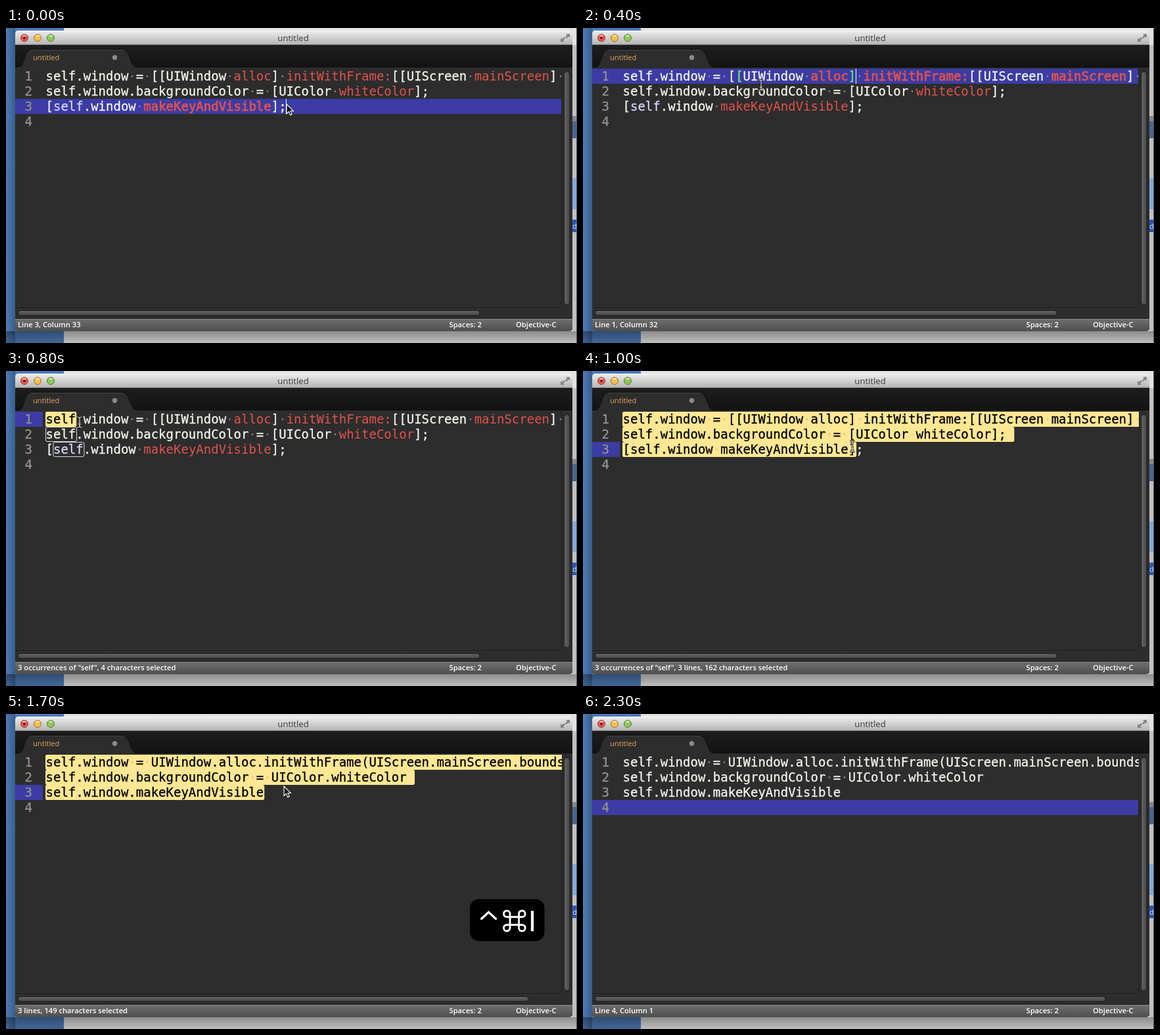
An HTML page for the animation above (2.4 s loop, 869 by 480 pixels).

```html
<!DOCTYPE html>
<html lang="en">
<head>
<meta charset="utf-8">
<title>Editor demo</title>
<style>
  html, body { margin: 0; width: 100%; height: 100%; overflow: hidden; background: #b4b4b4; }
  svg { display: block; width: 869px; height: 480px; }
  text { white-space: pre; }
  .ui { font-family: "Open Sans", "Noto Sans", sans-serif; }
  .status { font-size: 11.2px; font-weight: 600; fill: #fff; }
  .code { font: 19px "DejaVu Sans Mono", monospace; fill: #f4f4ee; stroke: #f4f4ee; stroke-width: .3; }
  .code .red { fill: #e0524c; stroke: none; }
  .code .self { fill: #d4d4ff; stroke: #d4d4ff; }
  .code .match { fill: #62f07c; stroke: #62f07c; }
  .code .dot { fill: #777; stroke: none; }
  .code .picked { fill: #000; stroke: #000; }
  .code .pickedDot { fill: #dcc97f; stroke: none; }
  .active .red { stroke: #e0524c; stroke-width: .75; }
  .active .dot { fill: #7d7dc4; }
  .num { font: 19px "DejaVu Sans Mono", monospace; fill: #91918c; stroke: #91918c; stroke-width: .4; }
</style>
</head>
<body>
<svg viewBox="0 0 869 480">
  <defs>
    <linearGradient id="title" x2="0" y2="1"><stop stop-color="#eeeeee"/><stop offset="1" stop-color="#b3b3b3"/></linearGradient>
    <linearGradient id="tabs" x2="0" y2="1"><stop stop-color="#1d1d1d"/><stop offset="1" stop-color="#131313"/></linearGradient>
    <linearGradient id="foot" x2="0" y2="1"><stop stop-color="#707070"/><stop offset="1" stop-color="#4e4e4e"/></linearGradient>
    <linearGradient id="thumbH" x2="0" y2="1"><stop stop-color="#646464"/><stop offset="1" stop-color="#484848"/></linearGradient>
    <linearGradient id="thumbV"><stop stop-color="#646464"/><stop offset="1" stop-color="#484848"/></linearGradient>
    <linearGradient id="under" x2="0" y2="1"><stop stop-color="#000" stop-opacity=".38"/><stop offset="1" stop-color="#000" stop-opacity=".16"/></linearGradient>
    <linearGradient id="side"><stop stop-color="#000" stop-opacity="0"/><stop offset="1" stop-color="#000" stop-opacity=".25"/></linearGradient>
    <clipPath id="pane"><rect x="14" y="60" width="832" height="367"/></clipPath>
  </defs>

  <!-- desktop -->
  <rect width="869" height="480" fill="#e2e2e2"/>
  <rect width="88" height="480" fill="#4d7cb8"/>
  <rect width="14" height="480" fill="url(#side)"/>
  <rect x="862" y="26" width="7" height="436" fill="#c0c0c2"/>
  <rect x="862" y="134" width="7" height="8" fill="#85888d"/>
  <rect x="862" y="142" width="7" height="26" fill="#4b658d"/>
  <rect x="862" y="229" width="7" height="47" fill="#86a9d6"/>
  <rect x="862" y="292" width="7" height="19" fill="#2b56b4"/>
  <text class="ui" x="862" y="306" font-size="11" fill="#dce6fa">d</text>
  <rect y="462" width="869" height="18" fill="url(#under)"/>
  <rect x="868" width="1" height="480" fill="#55585c"/>

  <!-- window -->
  <path d="M14 26V9q0-5 5-5H857q5 0 5 5V26Z" fill="url(#title)"/>
  <path d="M18 4.5H858" stroke="#f8f8f8"/>
  <rect x="14" y="25" width="848" height="1" fill="#707070"/>
  <g stroke-width="1">
    <circle cx="28" cy="15" r="5.5" fill="#ec5750" stroke="#963b37"/>
    <circle cx="28" cy="15" r="2" fill="#65100d"/>
    <circle cx="48" cy="15" r="5.5" fill="#f3bd4e" stroke="#9a7430"/>
    <circle cx="68" cy="15" r="5.5" fill="#8fc858" stroke="#547c35"/>
    <g fill="#fff" opacity=".5"><ellipse cx="28" cy="11.8" rx="3" ry="1.5"/><ellipse cx="48" cy="11.8" rx="3" ry="1.5"/><ellipse cx="68" cy="11.8" rx="3" ry="1.5"/></g>
  </g>
  <text class="ui" x="437" y="20" font-size="13.1" text-anchor="middle" fill="#3c3c3c">untitled</text>
  <path d="M852 9h6v6l-2-2-3 3-2-2 3-3Z M844 15l2 2 3-3 2 2-3 3 2 2h-6Z" fill="#858585"/>
  <rect x="14" y="26" width="848" height="34" fill="url(#tabs)"/>
  <rect x="14" y="59" width="848" height="401" fill="#2d2d2d"/>
  <path d="M14 59.5H20C30 59 27 32.5 39 32.5H177C189 32.5 188 59 198 59.5H862" fill="#2d2d2d" stroke="#0c0c0c"/>
  <path d="M20 60C30 59 27 33 39 33H177C189 33 188 59 198 60Z" fill="#2d2d2d"/>
  <path d="M38 33.5H178" stroke="#484848"/>
  <text class="ui" x="41" y="49" font-size="11.2" fill="#e8a45c">untitled</text>
  <circle cx="165.500" cy="45" r="3.7" fill="#8b8b8b"/>

  <g clip-path="url(#pane)">
    <g id="marks"></g>
    <g id="lines"></g>
    <rect id="caret" width="1" height="23" fill="#f8f8f0"/>
  </g>

  <path d="M846.5 60V426.500H14" fill="none" stroke="#191919"/>
  <path d="M847.5 60V427.500H14" fill="none" stroke="#383838"/>
  <rect x="849.5" y="66.5" width="8.500" height="355" rx="4.250" fill="url(#thumbV)" stroke="#1b1b1b"/>
  <rect id="thumb" x="18.5" y="430.500" height="7.500" rx="3.750" fill="url(#thumbH)" stroke="#1b1b1b"/>

  <path d="M14 443H862V457q0 5-5 5H19q-5 0-5-5Z" fill="url(#foot)"/>
  <path d="M14 443.500H862" stroke="#838383"/>
  <path d="M14 442.500H862" stroke="#171717"/>
  <text class="ui status" id="status" x="18" y="456"></text>
  <text class="ui status" x="674.500" y="456">Spaces: 2</text>
  <text class="ui status" x="776" y="456">Objective-C</text>

  <g id="keys" fill="none" stroke="#fff" stroke-width="3.200">
    <rect x="706" y="282" width="113.500" height="64" rx="14" fill="#000" stroke="none"/>
    <path d="M722.500 313L734.500 302L746.500 313"/>
    <path id="command" d="M767 309V304.500A4.800 4.800 0 1 0 762.200 309.300H785.300A4.800 4.800 0 1 0 780.500 304.500V326A4.800 4.800 0 1 0 785.300 321.200H762.200A4.800 4.800 0 1 0 767 326Z" stroke-width="2.900"/>
    <text x="794.750" y="331" fill="#fff" stroke="none" style="font:45px 'Liberation Sans',Arial,sans-serif">I</text>
  </g>

  <path id="arrow" d="M0 0V14.500L3.400 11.400L5.700 16.700L8.200 15.600L5.900 10.500H10.400Z" fill="#111" stroke="#fff" stroke-width="1.100"/>
  <g id="beam" fill="none">
    <path d="M-3.500 -8Q0 -8 0 -5.500V5.500Q0 8 -3.500 8M3.500 -8Q0 -8 0 -5.500V5.500Q0 8 3.500 8M-2 3H2" stroke="#111" stroke-width="2.800"/>
    <path d="M-3.500 -8Q0 -8 0 -5.500V5.500Q0 8 -3.500 8M3.500 -8Q0 -8 0 -5.500V5.500Q0 8 3.500 8M-2 3H2" stroke="#f2f2f2" stroke-width="1.100"/>
  </g>
</svg>
<script>
const LOOP = 2400, STEP = 100;
const LEFT = 60.5, TOP = 62, CHAR = 11.439, ROW = 23;

const before = [
  'self.window = [[UIWindow alloc] initWithFrame:[[UIScreen mainScreen] bounds]];',
  'self.window.backgroundColor = [UIColor whiteColor];',
  '[self.window makeKeyAndVisible];',
  ''
];
const after = [
  'self.window = UIWindow.alloc.initWithFrame(UIScreen.mainScreen.bounds)',
  'self.window.backgroundColor = UIColor.whiteColor',
  'self.window.makeKeyAndVisible',
  ''
];
const messages = /alloc|initWithFrame:|mainScreen|bounds|whiteColor|makeKeyAndVisible/g;

// Cursor position by start time; a selection always runs from the top to it.
const edits = [
  { at: 0, row: 2, col: 32 },
  { at: 300, row: 0, col: 31, match: [15, 30] },
  { at: 700, row: 0, col: 0 },
  { at: 800, row: 0, col: 4, select: true, found: true },
  { at: 900, row: 1, col: 21, select: true, found: true },
  { at: 1000, row: 2, col: 31, select: true, found: true },
  { at: 1100, row: 2, col: 32, select: true, found: true },
  { at: 1500, row: 2, col: 29, select: true, converted: true },
  { at: 1900, row: 3, col: 0, converted: true }
];

// time, x, y
const path = [
  [0, 427, 116], [100, 426, 108], [200, 418, 82], [300, 400, 80], [400, 271, 87],
  [600, 63, 76], [700, 63, 76], [800, 112, 78], [900, 300, 100], [1000, 410, 115],
  [1100, 428, 119], [1300, 423, 110], [1700, 423, 110], [1800, 414, 150], [1900, 406, 178], [2200, 406, 178]
];

const $ = id => document.getElementById(id);
const show = (id, on) => $(id).setAttribute('visibility', on ? 'visible' : 'hidden');
const xAt = col => LEFT + col * CHAR;
const rect = (x, y, w, h, extra) => `<rect x="${x}" y="${y}" width="${w}" height="${h}" ${extra}/>`;

function pointerAt(t) {
  const i = Math.max(1, path.findIndex(p => p[0] >= t));
  const [a, b] = [path[i - 1], path[i]];
  const k = (t - a[0]) / (b[0] - a[0]);
  return [1, 2].map(n => a[n] + (b[n] - a[n]) * k);
}

function selectedCols(edit, row, text) {
  if (!edit.select || row > edit.row) return 0;
  return row < edit.row ? text.length + 1 : edit.col;
}

function lineMarkup(text, row, edit) {
  const styles = Array(text.length).fill('');
  const paint = (start, length, style) => styles.fill(style, start, start + length);
  if (!edit.converted) {
    for (const m of text.matchAll(messages)) paint(m.index, m[0].length, 'red');
    if (row === 2) paint(1, 4, 'self');
  }
  if (edit.match && row === edit.row) edit.match.forEach(col => paint(col, 1, 'match'));
  const picked = selectedCols(edit, row, text);
  const runs = [];
  [...text].forEach((ch, i) => {
    const space = ch === ' ';
    const style = i < picked ? (space ? 'pickedDot' : 'picked') : space ? 'dot' : styles[i];
    const last = runs[runs.length - 1];
    if (last && last.style === style) last.text += space ? '·' : ch;
    else runs.push({ style, text: space ? '·' : ch });
  });
  const spans = runs.map(r => `<tspan class="${r.style}">${r.text}</tspan>`).join('');
  const y = TOP + 18 + row * ROW;
  const active = !edit.select && row === edit.row ? ' active' : '';
  return `<text class="num" x="28.500" y="${y}">${row + 1}</text>` +
    `<text class="code${active}" x="${LEFT}" y="${y}">${spans}</text>`;
}

function marksMarkup(edit, lines) {
  const y = TOP + edit.row * ROW;
  if (!edit.select) return rect(14, y, 831, ROW, 'rx="2" fill="#3c3ca4"');
  let out = rect(14, y, 42, ROW, 'fill="#3c3ca4"');
  lines.forEach((text, row) => {
    const cols = selectedCols(edit, row, text);
    if (cols) out += rect(60, TOP + row * ROW, cols * CHAR + 1.5, ROW, 'rx="2.500" fill="#ffe793"');
  });
  if (edit.found && edit.row === 0) {
    [[1, 0], [2, 1]].forEach(([row, col]) => {
      out += rect(xAt(col), TOP + row * ROW + .5, 47, ROW - 1, 'rx="2.500" fill="none" stroke="#d8d8d8"');
    });
  }
  return out;
}

function statusText(edit, lines) {
  if (!edit.select) return `Line ${edit.row + 1}, Column ${edit.col + 1}`;
  const count = lines.reduce((sum, text, row) => sum + selectedCols(edit, row, text), 0);
  return (edit.found ? '3 occurrences of "self", ' : '') +
    (edit.row ? `${edit.row + 1} lines, ` : '') + `${count} characters selected`;
}

let drawn;
function drawEdit(edit) {
  if (edit === drawn) return;
  drawn = edit;
  const lines = edit.converted ? after : before;
  $('marks').innerHTML = marksMarkup(edit, lines);
  $('lines').innerHTML = lines.map((text, row) => lineMarkup(text, row, edit)).join('');
  $('status').textContent = statusText(edit, lines);
  $('thumb').setAttribute('width', edit.converted ? 776.5 : 702.5);
  $('caret').setAttribute('x', Math.floor(xAt(edit.col)));
  $('caret').setAttribute('y', TOP + edit.row * ROW);
}

function render(now) {
  const t = Math.floor(now % LOOP / STEP) * STEP;
  const edit = edits.filter(e => e.at <= t).pop();
  drawEdit(edit);
  show('caret', !edit.select && t < 2300);

  show('keys', t >= 1400 && t < 2200);
  $('keys').setAttribute('opacity', t === 2100 ? .5 : 1);

  const isArrow = t < 200 || (t >= 1300 && t < 1800);
  const visible = t < 2300;
  show('arrow', visible && isArrow);
  show('beam', visible && !isArrow);
  if (visible) {
    const [x, y] = pointerAt(t);
    $(isArrow ? 'arrow' : 'beam').setAttribute('transform', `translate(${x} ${y})`);
  }
}

const start = performance.now();
function tick() {
  render(performance.now() - start);
  requestAnimationFrame(tick);
}
tick();
</script>
</body>
</html>
```
